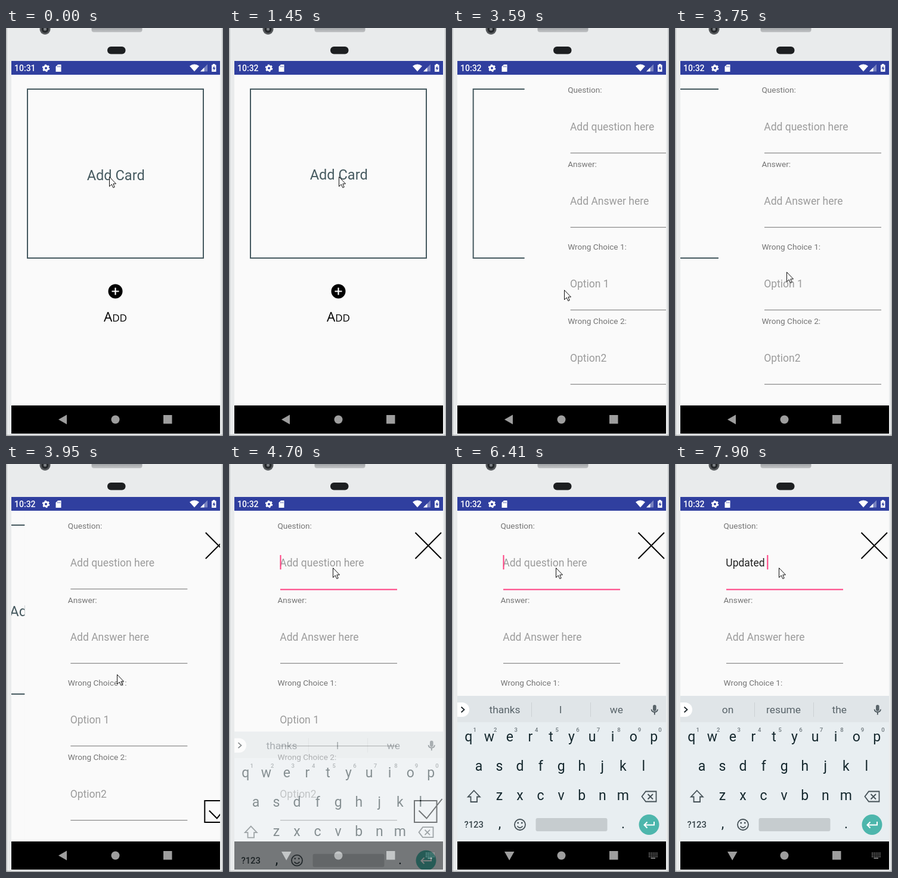
An HTML page that plays this animation: 364 px wide and 681 px high, repeating every 8000 ms.

```html
<!DOCTYPE html>
<html lang="en">
<head>
<meta charset="utf-8">
<title>Flashcard app</title>
<style>
  html, body { margin: 0; width: 100%; height: 100%; overflow: hidden; background: #e9ebec; }
  svg { display: block; width: 364px; height: 681px; font-family: Roboto, sans-serif; }
  text { white-space: pre; }
  .mid { text-anchor: middle; }
  .card { font-size: 23.6px; fill: #465a60; }
  .label { font-size: 13.6px; fill: #757575; }
  .hint { font-size: 17.5px; fill: #9b9b9b; }
  .key { font-size: 23px; fill: #14272d; }
  .digit { font-size: 9.5px; font-weight: 500; fill: #6d777c; }
  .word { font-size: 17.4px; fill: #59646a; }
  .line { fill: none; stroke: #455157; stroke-width: 1.8; }
</style>
</head>
<body>
<svg viewBox="0 0 364 681">
  <defs>
    <clipPath id="page"><rect x="9" y="78" width="350" height="552"/></clipPath>
    <clipPath id="screen"><rect x="9" y="78" width="350" height="599"/></clipPath>
    <clipPath id="reveal"><circle id="disc" cx="183.5" cy="244" r="0"/></clipPath>
    <linearGradient id="speaker" x2="0" y2="1">
      <stop stop-color="#8f9295"/><stop offset="1" stop-color="#c2c4c6"/>
    </linearGradient>
  </defs>

  <!-- phone body -->
  <rect width="364" height="681" fill="#e9ebec"/>
  <path d="M1 0V681M363 0V681" stroke="#96999b"/>
  <path d="M0 680H364" stroke="#85888a"/>
  <circle cx="65.500" cy="2" r="9" fill="#55585b"/>
  <circle cx="65.500" cy="2" r="6" fill="#26292c"/>
  <circle cx="65.500" cy="2" r="2.500" fill="#7a7e82"/>
  <rect x="143.500" y="-4" width="85" height="11" rx="4" fill="url(#speaker)"/>
  <rect x="170" y="31" width="30.500" height="12.500" rx="6" fill="#1d1f21"/>

  <!-- status bar -->
  <rect x="9" y="55" width="350" height="23" fill="#303f9f"/>
  <g fill="#fff">
    <text id="clock" x="14" y="72" font-size="14" font-weight="500"></text>
    <circle cx="67" cy="67" r="3.500" fill="none" stroke="#fff" stroke-width="3"/>
    <circle cx="67" cy="67" r="5.300" fill="none" stroke="#fff" stroke-width="2" stroke-dasharray="2.800 2.750"/>
    <path d="M87 61H92.500V73H83.500V64.500Z"/>
    <path d="M86.500 63V65.500M88.500 63V65.500M90.500 63V65.500" stroke="#303f9f" stroke-width=".7"/>
    <path d="M308 63.500Q316 57.500 324 63.500L316 72.500Z"/>
    <path d="M338 60.500V72.500H326Z" opacity=".35"/>
    <path d="M332.500 66V72.500H326Z"/>
    <path d="M347 60H350.500V61.500H352.500V73H345V61.500H347Z"/>
    <path d="M349.500 63L346.500 68H348.500V71.500L351.300 66.500H349.500Z" fill="#303f9f"/>
  </g>

  <g clip-path="url(#page)">
    <rect x="9" y="77" width="350" height="553" fill="#fafafa"/>
    <g id="home">
      <rect x="36" y="102" width="295" height="282" fill="none" stroke="#465a60" stroke-width="2"/>
      <text id="front" class="card mid" x="184.200" y="253.600">Add Card</text>
      <g clip-path="url(#reveal)"><text id="back" class="card mid" x="184.200" y="252.600">Add Card</text></g>
      <circle cx="183.500" cy="439.500" r="12"/>
      <path d="M177.500 439.500H189.500M183.500 433.500V445.500" stroke="#fff" stroke-width="2.200"/>
      <text class="mid" x="183.500" y="489.500" font-family="Open Sans, sans-serif" font-size="22.500">A<tspan font-size="17">DD</tspan></text>
    </g>
    <g id="form">
      <rect x="9" y="77" width="350" height="553" fill="#fafafa"/>
      <g id="fields"></g>
      <g id="focus">
        <path d="M86 208.500H282" stroke="#fafafa" stroke-width="3"/>
        <path d="M86 209.500H282" stroke="#ff4081" stroke-width="2"/>
      </g>
      <text id="typed" class="hint" x="85.300" y="171" style="fill:#212121"></text>
      <rect id="caret" y="152" width="2" height="24" fill="#ff4081"/>
      <g fill="none" stroke="#000" stroke-width="2">
        <path d="M312.500 114.500L356 158M356 114.500L312.500 158"/>
        <path d="M311 562H348.500V598H311ZM318.500 578.500L331.500 591.500L357.500 559"/>
      </g>
    </g>
  </g>

  <!-- navigation bar -->
  <rect x="9" y="630" width="350" height="47"/>
  <g fill="#9e9e9e">
    <path id="navBack" d="M88 653.500L102 645.500V661.500Z"/>
    <path id="navDown" d="M88 647H104.500L96.200 661.500Z"/>
    <circle cx="183.500" cy="653.500" r="7"/>
    <rect x="264" y="646" width="14.500" height="14.500"/>
    <g id="navKeys" stroke="#9e9e9e" stroke-width="1.500">
      <path d="M330 649.500H345M330 652.500H345M330 655.500H345" stroke-dasharray="1.800 1.400"/>
      <path d="M333.500 658H341"/>
    </g>
  </g>

  <g clip-path="url(#screen)">
    <g id="keyboard">
      <rect x="9" y="387" width="350" height="243" fill="#e8eef1"/>
      <rect x="9" y="387" width="350" height="44" fill="#e0e5e8"/>
      <path d="M9 398H17A12 12 0 0 1 17 422H9Z" fill="#fff"/>
      <path class="line" d="M15.500 405.500L20.500 410L15.500 414.500" style="stroke:#1c2529"/>
      <path d="M133.500 398V422M232.500 398V422" stroke="#cbd1d4"/>
      <g id="words"></g>
      <rect x="337" y="402" width="5.600" height="10.500" rx="2.800" fill="#59646a"/>
      <path class="line" d="M334.500 409.500A5.300 5.300 0 0 0 345 409.500M339.800 415V418.500"/>
      <g id="keys"></g>
      <path id="shift" class="line" d="M36.800 545L46.800 555.500H42V564H31.500V555.500H26.800Z"/>
      <path class="line" d="M325 546.500H342.500V563.500H325L318.500 555ZM328.500 551L337 559.500M337 551L328.500 559.500"/>
      <text x="20.500" y="607" font-size="14.800" font-weight="500" fill="#37444a">?123</text>
      <text class="key mid" x="80" y="608">,</text>
      <text class="key mid" x="287" y="608">.</text>
      <circle class="line" cx="114" cy="602" r="9"/>
      <path class="line" d="M109.500 604.500Q114 610 118.500 604.500"/>
      <path d="M109.500 599H112M116 599H118.500" stroke="#455157" stroke-width="2.400"/>
      <rect x="140.500" y="591" width="120" height="22" rx="3" fill="#c6cccf"/>
      <circle cx="330.500" cy="602" r="17" fill="#4db6ac"/>
      <path d="M339 597V602.500H323M327.500 597.500L322.500 602.500L327.500 607.500" fill="none" stroke="#fff" stroke-width="2"/>
    </g>
  </g>

  <path id="pointer" d="M.5 .5V16.500L4.200 13L6.800 18.500L9.200 17.500L6.800 12H11.500Z" fill="#fff" stroke="#111"/>
</svg>

<script>
const LOOP = 8000;
const $ = id => document.getElementById(id);

function addText(parent, cls, x, y, content) {
  const el = document.createElementNS('http://www.w3.org/2000/svg', 'text');
  el.setAttribute('class', cls);
  el.setAttribute('x', x);
  el.setAttribute('y', y);
  el.textContent = content;
  parent.append(el);
  return el;
}

const fields = [
  [108, 'Question:', 'Add question here'],
  [232, 'Answer:', 'Add Answer here'],
  [370, 'Wrong Choice 1:', 'Option 1'],
  [494, 'Wrong Choice 2:', 'Option2'],
];
const hints = fields.map(([y, label, hint]) => {
  addText($('fields'), 'label', 81.5, y, label);
  $('fields').insertAdjacentHTML('beforeend',
    `<path d="M86 ${y + 100.7}H282" stroke="#8b8b8b" stroke-width="1.2"/>`);
  return addText($('fields'), 'hint', 85.3, y + 63, hint);
});

const letters = [];
[['qwertyuiop', 27.8, 463], ['asdfghjkl', 45, 512], ['zxcvbnm', 79.5, 561]].forEach(([row, x0, y], r) => {
  [...row].forEach((ch, i) => {
    const x = x0 + i * 34.55;
    letters.push([addText($('keys'), 'key mid', x, y, ch), ch]);
    if (r === 0) addText($('keys'), 'digit mid', x + 10.3, 447, (i + 1) % 10);
  });
});
const words = [88.5, 182, 275.8].map(x => addText($('words'), 'word mid', x, 416, ''));

// Held values: [time, value]
const typing = [[0, ''], [6650, 'U'], [6890, 'Up'], [7190, 'Upd'], [7220, 'Upda'], [7260, 'Updat'],
  [7720, 'Update'], [7770, 'Updated'], [7850, 'Updated ']];
const suggestions = [[0, 'thanks|I|we'], [6680, 'Us|U|Up'], [6940, 'Upon|Up|Up'],
  [7220, 'Upside|Update|Updated'], [7770, 'Updates|Updated|Update'], [7900, 'on|resume|the']];
const caretOn = [[0, false], [4470, true], [4920, false], [5420, true], [5920, false], [6410, true]];
const caretX = { '': 85.5, 'Updated ': 154.3 };

// Interpolated values: [time, x, y]
const pointerPath = [[0, 173, 248], [30, 173, 248], [170, 184, 248], [2330, 184, 248], [2560, 203, 350],
  [2740, 211, 455], [2800, 205, 462], [2930, 188, 437], [3640, 188, 437], [3950, 186, 352],
  [4290, 174, 173], [LOOP, 174, 173]];

const held = (steps, t) => steps.findLast(s => s[0] <= t)[1];
const clamp = v => Math.min(1, Math.max(0, v));
const show = (el, on) => el.setAttribute('visibility', on ? 'visible' : 'hidden');
const move = (el, x, y) => el.setAttribute('transform', `translate(${x} ${y})`);

function along(path, t) {
  const i = path.findIndex(p => p[0] > t);
  const [a, b] = [path[i - 1], path[i]];
  const k = (t - a[0]) / (b[0] - a[0]);
  return [1, 2].map(n => a[n] + (b[n] - a[n]) * k);
}

function draw(t) {
  $('clock').textContent = t < 1450 ? '10:31' : '10:32';
  move($('pointer'), ...along(pointerPath, t).map(Math.round));

  // card flips with a circular reveal
  const flipped = t >= 670 && t < 2010;
  show($('front'), !flipped);
  show($('back'), flipped);
  $('disc').setAttribute('r', 205 * (1 - Math.cos(Math.PI * clamp((t - 650) / 960))) / 2);

  // form slides in from the right
  show($('form'), t >= 3590);
  move($('form'), 350 * clamp((4240 - t) / 1144) ** 2, 0);
  move($('home'), -129 * Math.max(0, (t - 3590) / 360), 0);

  const text = held(typing, t);
  const focused = t >= 4470;
  show($('focus'), focused);
  show(hints[0], t >= 3590 && !text);
  $('typed').textContent = text;
  show($('caret'), held(caretOn, t));
  $('caret').setAttribute('x', caretX[text] ?? 85.5 + $('typed').getComputedTextLength());

  // keyboard rises and fades in
  const rise = clamp((t - 4520) / 360);
  show($('keyboard'), rise > 0);
  $('keyboard').setAttribute('opacity', rise);
  move($('keyboard'), 0, 120 * (1 - rise));
  show($('navBack'), rise === 0);
  show($('navDown'), rise > 0);
  show($('navKeys'), rise > 0);

  const caps = t >= 6620 && t < 6710;
  for (const [el, ch] of letters) el.textContent = caps ? ch.toUpperCase() : ch;
  $('shift').style.fill = caps ? '#455157' : 'none';
  held(suggestions, t).split('|').forEach((word, i) => { words[i].textContent = word; });
}

const start = performance.now();
function tick() {
  draw((performance.now() - start) % LOOP);
  requestAnimationFrame(tick);
}
tick();
</script>
</body>
</html>
```
